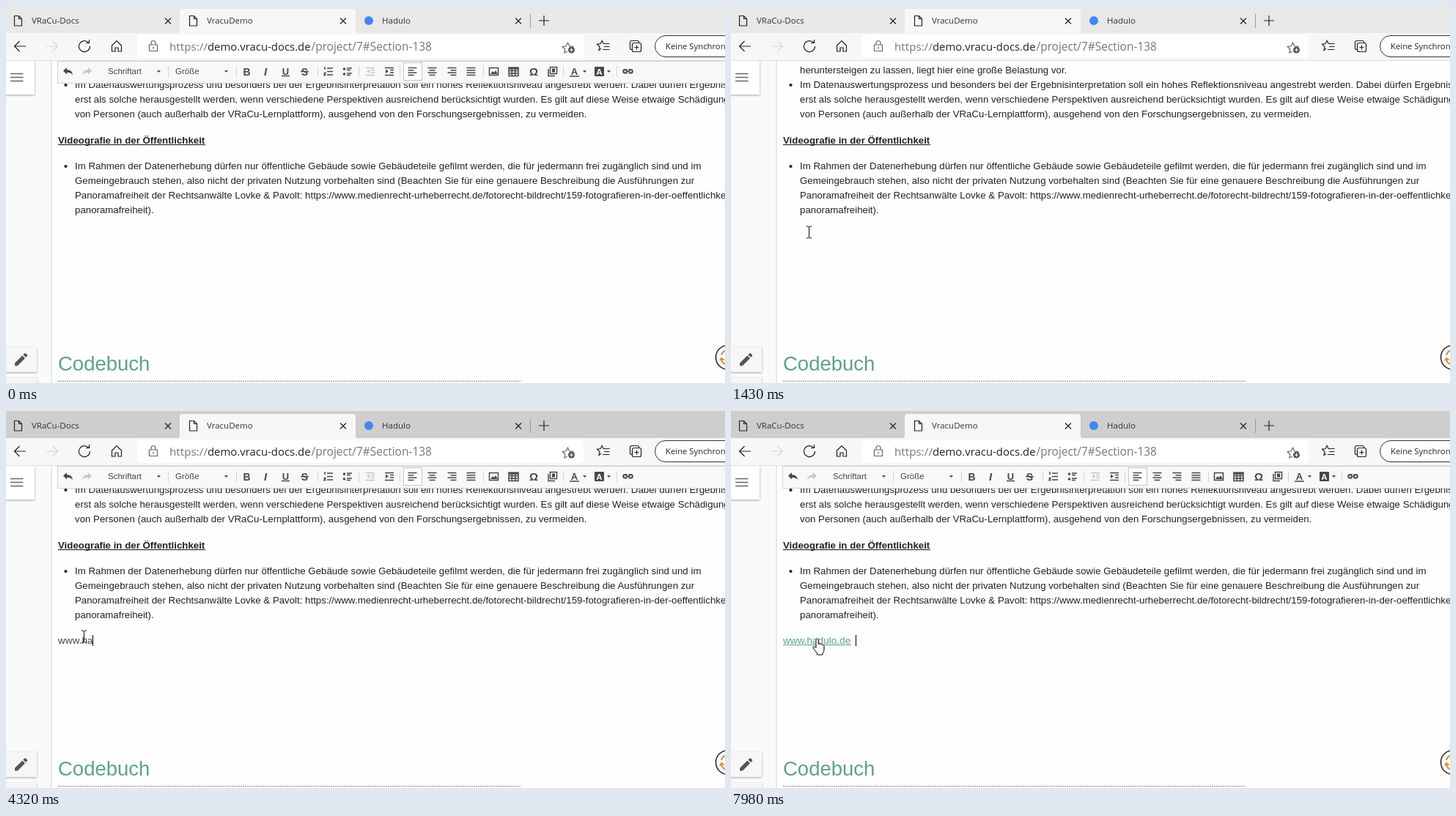
An HTML page for the animation above (8 s loop, 981x515 px).

```html
<!DOCTYPE html>
<html lang="de">
<head>
<meta charset="utf-8">
<title>Editor</title>
<style>
html, body { margin: 0; width: 100%; height: 100%; overflow: hidden; background: #fefefe; }
svg { display: block; width: 100vw; height: 100vh; }
text { font-family: "Liberation Sans", Arial, sans-serif; white-space: pre; }
.ui { font-family: "Open Sans", "Noto Sans", sans-serif; }
.line { fill: none; stroke: #222; stroke-width: 1.2; }
.bar { fill: none; stroke: #474747; stroke-width: 1.5; }
.solid { fill: #474747; }
.dim { opacity: .28; }
</style>
</head>
<body>
<svg id="stage" viewBox="0 0 981 515" xmlns="http://www.w3.org/2000/svg">
  <defs>
    <filter id="shadow" x="-20%" y="-20%" width="140%" height="150%">
      <feDropShadow dx="0" dy="1" stdDeviation="1.5" flood-opacity=".35"/>
    </filter>
    <path id="caretDown" d="M0 0h5l-2.5 3z" class="solid"/>
    <path id="page" class="line" d="M.5.5h6l4 4v9.500h-10zM6.500.5v4h4"/>
    <path id="close" class="line" d="M-4-4l8 8M4-4l-8 8"/>
  </defs>

  <rect width="981" height="515" fill="#fefefe"/>
  <rect y="75" width="62" height="440" fill="#f9fafb"/>
  <path d="M62 75v440" stroke="#dfe2e8" stroke-width="1.5"/>

  <g id="copy" fill="#222" font-size="13.28"></g>
  <path d="M71 189.500h201" stroke="#111"/>
  <g fill="#222"><circle cx="81.500" cy="108" r="2.100"/><circle cx="81.500" cy="219" r="2.100"/></g>
  <text x="71" y="498" font-size="27.5" fill="#5fa18f">Codebuch</text>
  <path d="M71 512.500h631" stroke="#888" stroke-dasharray="2 1"/>

  <g id="insert" fill="none" stroke="#56a08c">
    <circle cx="84" cy="352" r="12.500" stroke-width="1.300"/>
    <path d="M77.500 352h13M84 345.500v13" stroke-width="2"/>
    <path d="M104 350.500h877M104 353.500h877" stroke-dasharray="3 2"/>
  </g>

  <text id="typed" x="71" y="318" font-size="13.6"></text>
  <path id="underline" d="M71 319.500h93" stroke="#56a08c"/>
  <path id="caret" d="M.5 306v15" stroke="#000"/>

  <!-- side controls -->
  <g filter="url(#shadow)">
    <rect x="-4" y="74" width="43" height="47" fill="#fff"/>
    <rect x="-4" y="466" width="46" height="34" fill="#f6f6f6"/>
    <rect x="-4" y="508" width="46" height="20" fill="#f6f6f6"/>
  </g>
  <path d="M6 92.500h17.500M6 97.500h17.500M6 102.500h17.500" stroke="#666" stroke-width="1.600"/>
  <path d="M12 491.500v-3.700l10.300-10.300 3.700 3.700-10.300 10.300zM23.400 476.400l1.900-1.900q.8-.7 1.600 0l2 2q.8.8 0 1.600l-1.800 2z" fill="#555"/>
  <circle cx="985" cy="480" r="16.500" fill="#fff" stroke="#222" stroke-width="1.500"/>
  <path d="M976 477a9.500 9.500 0 0 1 8-7M976 483a9.500 9.500 0 0 0 7 7" fill="none" stroke="#d9913a" stroke-width="2"/>
  <path d="M972.500 484.500l3.500-5 5 4z" fill="#d9913a"/>

  <!-- editor toolbar -->
  <g id="toolbar">
    <rect x="70.500" y="75.500" width="920" height="30" fill="#f8f8f8" stroke="#d1d1d1"/>
    <path d="M221.500 82v15M314.500 82v15M425.500 82v15M481.500 82v15M537.500 82v15M651.500 82v15M760.500 82v15M833.500 82v15" stroke="#d4d4d4"/>
    <path class="solid" d="M78 88.500l5-4.500v3q7 0 8 7-3-3.500-8-3.300v2.800z"/>
    <path class="solid dim" d="M117 88.500l-5-4.500v3q-7 0-8 7 3-3.500 8-3.300v2.800z"/>
    <g font-size="11.5" fill="#474747">
      <text x="139" y="93">Schriftart</text><text x="231" y="93">Größe</text>
    </g>
    <use href="#caretDown" x="206" y="88"/><use href="#caretDown" x="298" y="88"/>
    <use href="#caretDown" x="787" y="88"/><use href="#caretDown" x="820" y="88"/>
    <g font-size="14" font-weight="bold" fill="#474747" text-anchor="middle">
      <text x="328.500" y="94.500">B</text>
      <text x="354" y="94.500" font-style="italic" font-family="Liberation Serif, serif" font-size="15">I</text>
      <text x="381.500" y="93.500" font-size="13">U</text><text x="407.500" y="94.500">S</text>
      <text x="720" y="94.500" font-size="15">Ω</text><text x="775.500" y="93.500" font-size="13">A</text>
    </g>
    <path class="bar" d="M376 95.500h11M402 89.500h11M769 96h13"/>
    <path class="bar" d="M438 85h8M438 89.500h8M438 94h8M465 85h7M465 92h7M465 87.500h5M465 94.500h5"/>
    <path class="bar" d="M435 83v4M433.500 91.500h2.500l-2 3h2.500"/>
    <circle class="solid" cx="461.500" cy="86" r="1.800"/><circle class="solid" cx="461.500" cy="93" r="1.800"/>
    <g class="dim"><path class="bar" d="M491 84.500h12M498 87.500h5M498 91h5M491 94.500h12"/><path class="solid" d="M496 86.500v5.500l-4-2.700z"/></g>
    <path class="bar" d="M517 84.500h12M524 87.500h5M524 91h5M517 94.500h12"/><path class="solid" d="M518 86.500v5.500l4-2.700z"/>
    <rect x="542.500" y="77.500" width="25" height="24" fill="#fff" stroke="#c4c4c4"/>
    <g id="aligns" class="bar"></g>
    <path class="bar" d="M659.500 84.500h12v10h-12z"/><path class="solid" d="M661 93l3-4 2 2 2-3 3 5z"/>
    <path class="bar" d="M686 84.500h13v11h-13zM686 88.500h13M686 92h13M690.300 86v9M694.700 86v9"/><path class="solid" d="M685.500 83.500h14v3h-14z"/>
    <path class="bar" d="M742.500 83.500h9v9h-9zM740 86v9.500h9"/><path class="solid" d="M745 85.500h4v5h-4z"/>
    <rect class="solid" x="803" y="83" width="13" height="13" rx="1"/>
    <text x="809.500" y="94" font-size="11.500" font-weight="bold" fill="#fff" text-anchor="middle">A</text>
    <path class="bar" style="stroke-width:2" d="M847.500 87h-3a2 2 0 0 0 0 4.500h3M849.500 87h3a2 2 0 0 1 0 4.500h-3M845.500 89.200h6"/>
  </g>

  <!-- browser frame -->
  <rect id="strip" width="981" height="37"/>
  <rect y="37" width="981" height="37.500" fill="#f7f7f7"/>
  <path d="M0 74.500h981" stroke="#dedede"/>
  <path d="M233 37.500q4 0 4-4V8q0-4 4-4h232q4 0 4 4v25.500q0 4 4 4z" fill="#f7f7f7"/>
  <path d="M715.500 11v19" stroke="#999"/>
  <use href="#page" x="11" y="13"/><use href="#page" x="250" y="13"/>
  <circle cx="495" cy="20" r="6" fill="#4285f4"/>
  <use href="#close" x="221" y="20.500"/><use href="#close" x="460" y="20.500"/><use href="#close" x="699" y="20.500"/>
  <path class="line" d="M727 20h14M734 13v14"/>
  <g font-size="11.5" fill="#333">
    <text class="ui" x="35" y="24">VRaCu-Docs</text>
    <text class="ui" x="274" y="24">VracuDemo</text>
    <text class="ui" x="513" y="24">Hadulo</text>
  </g>
  <path class="line" d="M11.500 55h15.500M18.500 48l-7 7 7 7"/>
  <path class="line" d="M55 55h15.500M63.500 48l7 7-7 7" style="stroke:#d5d5d5"/>
  <path class="line" d="M112.500 50a7.500 7.500 0 1 0 2 5M113.500 46v4.500h-4.500"/>
  <path class="line" d="M144.500 54l6.500-6.500 6.500 6.500v8h-4.500v-5h-4v5h-4.500z"/>
  <rect x="179" y="39.500" width="609" height="31.500" rx="4" fill="#fff"/>
  <g class="line" style="stroke:#666">
    <path d="M195.500 53h11v8.500h-11zM198 53v-2.500a3 3 0 0 1 6 0v2.500"/>
    <path d="M766 62l-4.200 2 1-5-3.600-3.500 5-.7 2.300-4.600 2.300 4.600 5 .7-2 2"/>
  </g>
  <circle cx="201" cy="57.300" r="1" fill="#666"/>
  <circle cx="771.500" cy="60" r="4.500" fill="#555"/><path d="M769 60h5M771.500 57.500v5" stroke="#fff"/>
  <g fill="#777">
    <text class="ui" x="223" y="61" font-size="15.25">https://</text>
    <text class="ui" x="275" y="61" font-size="14.9" fill="#222">demo.vracu-docs.de</text>
    <text class="ui" x="416.500" y="61" font-size="15.45">/project/7#Section-138</text>
  </g>
  <path class="line" d="M812 58l-3 2.500 1-5-3.500-3.300 4.600-.7 2-4.200 2 4.200h8.500M816 55.500h7.500M814 59.500h9.500"/>
  <path class="line" d="M854 59.500h-.5q-2 0-2-2v-8q0-2 2-2h8q2 0 2 2v.5"/>
  <rect class="line" x="854.500" y="50.500" width="12" height="12" rx="2"/><path class="line" d="M857.500 56.500h6M860.500 53.500v6"/>
  <rect x="885.500" y="40.500" width="150" height="29" rx="14.500" fill="#fff" stroke="#333"/>
  <text class="ui" x="900" y="59" font-size="11.3" fill="#222">Keine Synchronisierung</text>

  <!-- pointers -->
  <path id="arrow" d="M.5.5v16l3.700-3.500 2.600 5.900 2.300-1-2.500-5.800h5z" fill="#fff" stroke="#000"/>
  <path id="beam" d="M-3.500-8h2.500l1 1 1-1h2.500M0-7v14M-3.500 8h2.500l1-1 1 1h2.500" fill="none" stroke="#111"/>
  <path id="hand" d="M5 13V2a1.600 1.600 0 0 1 3.200 0v6a1.500 1.500 0 0 1 2.800.6 1.500 1.500 0 0 1 2.700.7 1.400 1.400 0 0 1 2.300 1.200v5q0 3-2 5v2H6.500v-2L1.200 13.500q-.8-1.700.6-2.200t3.200 1.700z" fill="#fff" stroke="#000"/>
</svg>
<script>
const LOOP = 8000;
const $ = id => document.getElementById(id);
const NS = "http://www.w3.org/2000/svg";

function add(parent, tag, attrs, content = "") {
  const el = document.createElementNS(NS, tag);
  for (const name in attrs) el.setAttribute(name, attrs[name]);
  el.textContent = content;
  parent.append(el);
}

const copy = [
  [94, 92, "heruntersteigen zu lassen, liegt hier eine große Belastung vor."],
  [94, 112, "Im Datenauswertungsprozess und besonders bei der Ergebnisinterpretation soll ein hohes Reflektionsniveau angestrebt werden. Dabei dürfen Ergebnisse"],
  [94, 132, "erst als solche herausgestellt werden, wenn verschiedene Perspektiven ausreichend berücksichtigt wurden. Es gilt auf diese Weise etwaige Schädigungen"],
  [94, 152, "von Personen (auch außerhalb der VRaCu-Lernplattform), ausgehend von den Forschungsergebnissen, zu vermeiden."],
  [71, 188, "Videografie in der Öffentlichkeit", "bold"],
  [94, 223, "Im Rahmen der Datenerhebung dürfen nur öffentliche Gebäude sowie Gebäudeteile gefilmt werden, die für jedermann frei zugänglich sind und im"],
  [94, 243, "Gemeingebrauch stehen, also nicht der privaten Nutzung vorbehalten sind (Beachten Sie für eine genauere Beschreibung die Ausführungen zur"],
  [94, 263, "Panoramafreiheit der Rechtsanwälte Lovke & Pavolt: https://www.medienrecht-urheberrecht.de/fotorecht-bildrecht/159-fotografieren-in-der-oeffentlichkeit-"],
  [94, 283, "panoramafreiheit)."]
];
for (const [x, y, line, weight = "normal"] of copy)
  add($("copy"), "text", { x, y, "font-weight": weight }, line);

// Alignment icons: centre, and how the short rows shift
[[554.5, -2], [581.5, 0], [608.5, 2], [634.5, null]].forEach(([cx, shift]) => {
  for (let row = 0; row < 4; row++) {
    const short = row % 2 && shift !== null;
    const half = short ? 4 : 6, mid = cx + (short ? shift : 0);
    add($("aligns"), "path", { d: `M${mid - half} ${84.5 + row * 3.3}h${half * 2}` });
  }
});

const ADDRESS = "www.hadulo.de";
const keyTimes = [2760, 2990, 3160, 3390, 4090, 4320, 4490, 4640, 4790, 4960, 5870, 6100, 6260];
const FOCUSED = 1660, LINKED = 6640;
const caretToggles = [FOCUSED, 2210, 2760, 3940, 4090, 5510, 5870, 7190, 7740];

// Pointer poses: time, shape, x, y
const poses = [
  [0, "", 0, 0],
  [70, "arrow", 46, 493], [143, "arrow", 36, 440], [216, "arrow", 26, 385], [290, "arrow", 22, 350],
  [450, "arrow", 70, 350], [530, "arrow", 112, 348], [600, "arrow", 124, 347],
  [680, "arrow", 125, 346], [760, "arrow", 123, 343], [840, "arrow", 119, 339],
  [920, "arrow", 115, 334], [990, "arrow", 111, 328], [1070, "arrow", 108, 322],
  [1150, "beam", 106.5, 317], [1220, "beam", 106.5, 313], [1300, "beam", 106.5, 307],
  [1430, "beam", 106.5, 309], [2300, "beam", 106.5, 308],
  [LINKED, "hand", 100, 308], [7740, "beam", 110.5, 304], [7980, "hand", 111, 310.5]
];

const countUntil = (times, t) => times.filter(time => time <= t).length;
const show = (id, on) => $(id).setAttribute("visibility", on ? "visible" : "hidden");

function draw(t) {
  const [, shape, x, y] = poses.filter(pose => pose[0] <= t).pop();
  for (const id of ["arrow", "beam", "hand"]) show(id, id === shape);
  if (shape) $(shape).setAttribute("transform", `translate(${x} ${y})`);

  // The tab strip darkens while the window has focus
  $("strip").setAttribute("fill", t < FOCUSED ? "#e8e8e8" : "#cecece");
  show("toolbar", t < 143 || t >= FOCUSED);
  show("insert", t >= 450 && t < 1070);

  const linked = t >= LINKED;
  const typed = $("typed");
  typed.textContent = ADDRESS.slice(0, countUntil(keyTimes, t));
  typed.setAttribute("fill", linked ? "#56a08c" : "#444");
  show("underline", linked && shape === "hand");

  const caretX = linked ? 170 : Math.floor(71 + typed.getComputedTextLength());
  $("caret").setAttribute("transform", `translate(${caretX} 0)`);
  show("caret", countUntil(caretToggles, t) % 2 === 1);
}

const start = performance.now();
function tick() {
  draw((performance.now() - start) % LOOP);
  requestAnimationFrame(tick);
}
draw(0);
requestAnimationFrame(tick);
</script>
</body>
</html>
```
